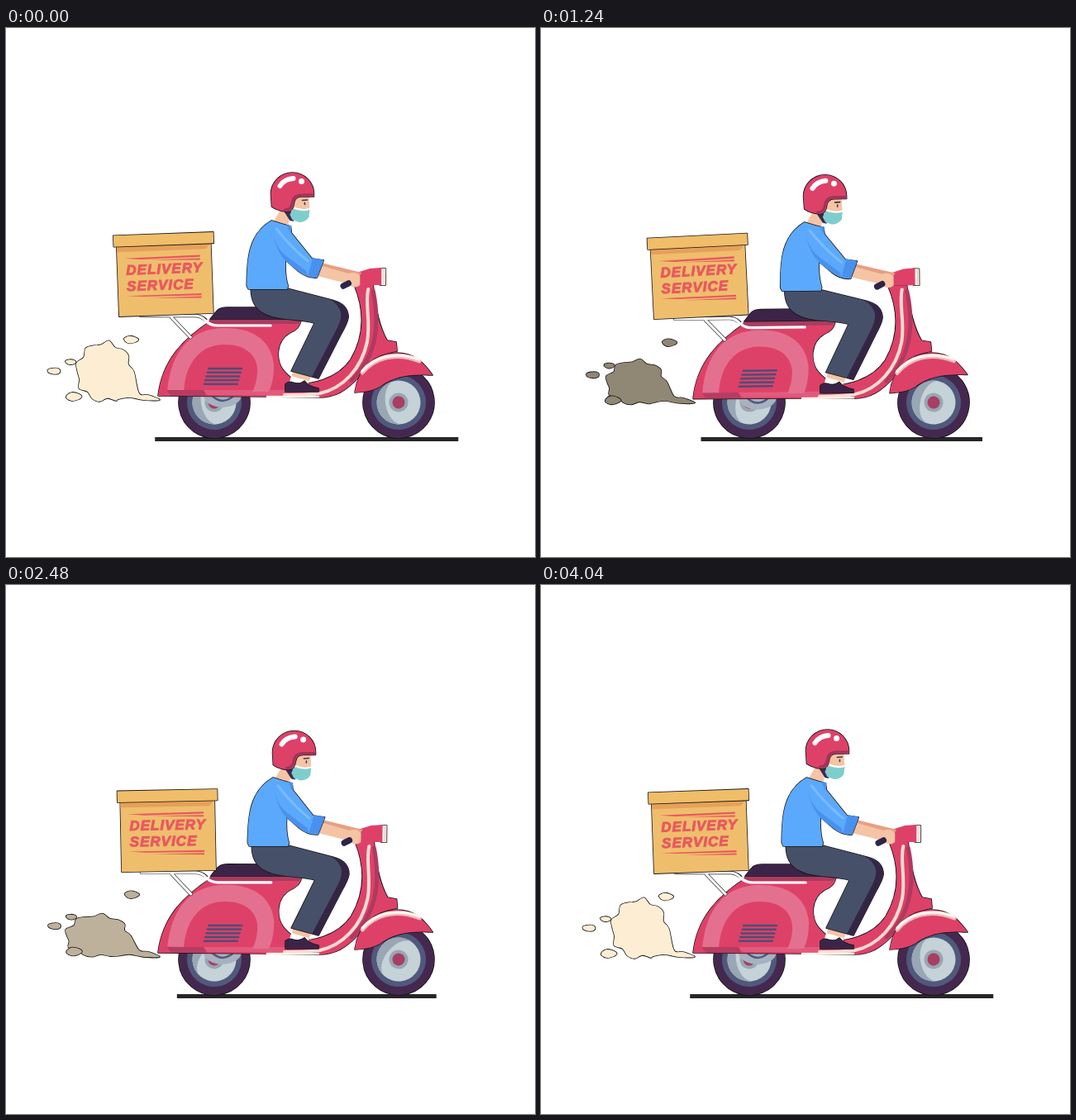
These frames come from a looping animation (640x640 px, 4.08 s). An HTML page:

```html
<!DOCTYPE html>
<html lang="en">
<head>
<meta charset="utf-8">
<title>Delivery scooter</title>
<style>
  html, body { margin: 0; width: 100%; height: 100%; overflow: hidden; background: #fff; }
  svg { display: block; width: 100vw; height: 100vh; }
  .edge { stroke: #151317; stroke-width: 1.6; paint-order: stroke; stroke-linejoin: round; }
  .line { fill: none; stroke-linecap: round; stroke-linejoin: round; }
  text { font: italic bold 17px "Liberation Sans", Arial, sans-serif; letter-spacing: 1px; fill: #e8585f; stroke: #e8585f; stroke-width: .9; }
</style>
</head>
<body>
<svg viewBox="0 0 640 640">
  <defs>
    <g id="wheel">
      <circle r="43" fill="#45284f" class="edge"/>
      <circle r="33" fill="#50597c"/>
      <circle r="26.5" fill="#c5d2d7"/>
      <path d="M0-26.5A26.5 26.5 0 0 0 0 26.5A16 26.5 0 0 1 0-26.5Z" fill="#99a6b4"/>
      <circle r="11.5" fill="#99a6b4"/>
      <circle r="7.5" fill="#a73f62"/>
    </g>
  </defs>

  <rect id="ground" y="495" height="5" fill="#262626"/>
  <path id="speed" stroke="#0d3a6b" stroke-width="1.8" d="M250 276H296M250 284H296M250 293H273"/>

  <g class="chassis">
    <g id="smoke" class="edge"></g>
  </g>

  <g transform="translate(252 453)"><use href="#wheel" class="spin"/></g>

  <g class="chassis">
    <!-- engine -->
    <path d="M239 444A23 15 0 0 0 285 444Z" fill="#a6b2c0"/>
    <path class="line" d="M245 440Q262 462 280 440M255 444H270" stroke="#50597c" stroke-width="2.5"/>
    <!-- rear body and floor -->
    <path class="edge" fill="#de4168" d="M184 445C189 402 214 376 250 353L357 352C356 362 350 366 343 369C326 379 327 401 334 412Q338 418 346 424L344 430C368 433 401 425 417 401C435 370 433 340 421 311L444 311C447 343 452 362 461 378L472 380L473 391C448 395 438 405 429 420C411 440 398 447 378 447L315 446Z"/>
    <path fill="#e4708f" d="M195 440C199 390 224 364 262 363C302 362 322 381 324 409Q324 427 318 440Z"/>
    <path fill="#de4168" d="M215 440C217 404 236 383 264 383C291 383 305 397 304 417Q303 431 298 440Z"/>
    <path fill="#b63c62" d="M194 438H239L242 445H200Z"/>
    <path fill="#e4708f" d="M239 438H338L342 444H244Z" opacity=".55"/>
    <path id="vents" class="line" stroke="#4d4d76" stroke-width="2.5"/>
    <!-- leg shield -->
    <path class="line" stroke="#b0395f" stroke-width="5" d="M444 318C452 357 449 397 418 426"/>
    <path class="line" stroke="#fbdcd2" stroke-width="4" d="M438 316C434 334 441 353 437 379C430 413 407 436 380 442Q363 444 337 444"/>
    <path class="line" stroke="#fff3e9" stroke-width="2.5" d="M316 446H378"/>
    <!-- seat -->
    <path fill="#a93c60" d="M246 352H357L354 358H244Z"/>
    <path class="edge" fill="#3c2448" d="M247 352C254 344 255 338 267 338H330L357 352Z"/>
    <!-- rack -->
    <g class="line">
      <path stroke="#29272d" stroke-width="4.5" d="M163 348H228Q235 348 241 353M200 350L223 374"/>
      <path stroke="#fff" stroke-width="3.2" d="M163 348H228Q236 348 241 354Q247 360 256 360H320M200 350L223 374"/>
    </g>
    <!-- headlamp -->
    <path class="edge" fill="#fff1e8" d="M452 291H459V311H452Z"/>
    <path fill="#de4168" d="M421 311L424 296L440 291L454 290V311Z"/>
    <path stroke="#d9c6c6" d="M457 292V310"/>
  </g>

  <g id="box">
    <path class="edge" fill="#efbe6d" d="M136.5 262H250.5V348H136.5Z"/>
    <path fill="#e5a159" d="M136.5 263H250.5L244 270H136.5Z"/>
    <path class="edge" fill="#f0bd69" d="M133 250H254V263.5H133Z"/>
    <path fill="#e8585f" d="M145 278L237 277V279.3L165 280ZM174 281H237V283ZM146 323.5H237V325.7L165 325ZM174 327H237V329Z"/>
    <text x="147" y="298">DELIVERY</text>
    <text x="147" y="317.5">SERVICE</text>
  </g>

  <g transform="translate(475 453)"><use href="#wheel" class="spin"/></g>

  <g class="chassis">
    <!-- front fender -->
    <path class="edge" fill="#de4168" d="M422 441C426 411 446 394 472 393C495 393 506 406 516 420C488 418 470 422 455 432Q445 440 422 441Z"/>
    <path class="line" stroke="#efb9bd" stroke-width="5" d="M431 417C445 400 470 391 500 403"/>
    <path class="line" stroke="#fff6ee" stroke-width="3.5" d="M431 415C445 398 470 390 500 401"/>

    <!-- foot -->
    <path fill="#f4c4a5" d="M347 414L369 420L366 430L345 427Z"/>
    <path fill="#fff" d="M345 421L366 427L365 432L343 428Z"/>
    <path class="edge" fill="#3c2448" d="M338 431Q342 427 347 429Q355 432 361 427Q366 434 378 436V440H338Z"/>
    <!-- trousers -->
    <path class="edge" fill="#475069" d="M296 315H340L394 329Q414 334 414 350Q413 357 406 369L378 424L345 415L373 357C350 351 328 354 312 345Q296 337 296 315Z"/>
    <path fill="#352544" d="M390 328Q415 334 414 350Q413 357 406 369L378 424L370 422L400 364Q409 347 402 338Q398 331 390 328Z"/>

    <!-- arms and grip -->
    <path fill="#e79f82" d="M377 283L430 296L426 302L378 291Z"/>
    <path fill="#f4c4a5" d="M379 287L414 297Q423 294 428 300V311Q421 317 412 309L376 300Z"/>
    <path class="line" stroke="#2e2447" stroke-width="7.5" d="M408 312L414 309"/>
    <!-- shirt -->
    <path fill="#f4c4a5" d="M332 219H344L341 240L323 235Z"/>
    <path class="edge" fill="#5ba9fc" d="M321 233Q333 237 344 240L345 248L370 279L384 281L376 302Q364 303 353 294L338 281Q337 300 341 312L340 316H293L291 312C291 279 293 249 321 233Z"/>
    <path fill="#4991ee" d="M322 245Q325 266 339 276L363 294L365 300Q354 296 338 282Q325 268 322 245Z"/>
    <path class="line" stroke="#79bbff" stroke-width="3" d="M327 243Q345 266 365 282"/>
    <path fill="#4991ee" d="M371 278L384 281L376 302L365 300ZM339 238L345 239L344 249Z"/>

    <g id="head">
      <path fill="#f4c4a5" d="M346 203H366L367 222L345 226Z"/>
      <path class="line" stroke="#463047" stroke-width="1.6" d="M358 208.5L364 208M361 211.5V213.5"/>
      <path fill="#3b2b50" d="M334 219L344 220L348 234L343 233Z"/>
      <path fill="#7ecdcd" d="M346 219Q357 222 367 219L366 229Q362 235 354 235L346 232L343 226Z"/>
      <path class="line" stroke="#fff" stroke-width="2" d="M347 217Q357 222 367 219"/>
      <path class="edge" fill="#de4168" d="M320 201A26 26 0 0 1 372 201V204H357Q349 204 348 212Q347 222 339 222Q328 221 321 216Z"/>
      <path class="line" stroke="#9c3459" stroke-width="3" d="M371 202H357Q347 202 346 211Q345 220 337 220"/>
      <path class="line" stroke="#fff" stroke-width="6" d="M331 191Q336 183 347 182"/>
      <circle cx="357" cy="185.5" r="3.5" fill="#fff"/>
    </g>
  </g>
</svg>
<script>
  const $ = s => document.querySelector(s);
  const all = s => [...document.querySelectorAll(s)];
  const { sin, cos, PI } = Math;
  const LOOP = 4080, CYCLE = 4040, BEAT = CYCLE / 4;
  const mix = (a, b, k) => a + (b - a) * k;

  const ground = $('#ground'), speed = $('#speed'), smoke = $('#smoke');
  const box = $('#box'), head = $('#head');
  const chassis = all('.chassis'), wheels = all('.spin');

  $('#vents').setAttribute('d', Array.from({ length: 5 },
    (_, i) => `M${245 - i * 1.3} ${412 + i * 4.7}H${285 - i * 1.3}`).join(''));

  // Closed Catmull-Rom curve through [x, y] points
  function curve(points) {
    const at = i => points.at(i % points.length);
    return `M${at(0)}` + points.map((b, i) => {
      const a = at(i - 1), c = at(i + 1), e = at(i + 2);
      return `C${b.map((v, k) => v + (c[k] - a[k]) / 6)} ${c.map((v, k) => v - (e[k] - b[k]) / 6)} ${c}`;
    }).join('') + 'Z';
  }

  // Uneven arc of an ellipse, counter-clockwise from its right side
  const lumps = (cx, cy, rx, ry, count, sweep, seed) => Array.from({ length: count }, (_, i) => {
    const angle = -sweep * i / count;
    const r = 1 + .09 * sin(i * 2.4 + seed);
    return [cx + rx * r * cos(angle), cy + ry * r * sin(angle)];
  });

  const puffs = {
    tall: { x: 119, y: 416, rx: 33, ry: 35, dx: 0, dy: 0, red: 253, green: 238, blue: 211 },
    small: { x: 118, y: 424, rx: 33, ry: 27, dx: 8, dy: 1, red: 112, green: 105, blue: 88 },
    wide: { x: 104, y: 425, rx: 41, ry: 23, dx: -6, dy: -5, red: 253, green: 238, blue: 211 }
  };
  const drops = [
    { x: 58, y: 415, r: 7.5 }, { x: 78, y: 404, r: 6 }, { x: 151, y: 377, r: 8.5 }, { x: 82, y: 446, r: 9.5 }
  ];
  const puffParts = [0, ...drops].map(() =>
    smoke.appendChild(document.createElementNS('http://www.w3.org/2000/svg', 'path')));

  function drawSmoke(t) {
    const u = t <= CYCLE / 2 ? t / BEAT : 4 - t / BEAT;
    const [from, to] = u < 1 ? [puffs.tall, puffs.small] : [puffs.small, puffs.wide];
    const p = {};
    for (const key in from) p[key] = mix(from[key], to[key], u < 1 ? u : u - 1);

    const body = lumps(p.x, p.y, p.rx, p.ry, 19, 1.72 * PI, 2);
    const outline = [[186, 450], [172, 444], [161, 442], ...body, [136, 449], [150, 447], [166, 450]];
    puffParts[0].setAttribute('d', curve(outline));
    drops.forEach(({ x, y, r }, i) =>
      puffParts[i + 1].setAttribute('d', curve(lumps(x + p.dx, y + p.dy, r, r * .5, 7, 2 * PI, i))));
    smoke.setAttribute('fill', `rgb(${[p.red, p.green, p.blue].map(Math.round)})`);
  }

  function drawGround(t) {
    const p = t / BEAT % 1, turn = .48;
    const half = 183.5 - 28 * (p < turn ? p / turn : (1 - p) / (1 - turn));
    ground.setAttribute('x', 363.75 - half);
    ground.setAttribute('width', 2 * half);
  }

  function drawScooter(t) {
    const a = 2 * PI * t / CYCLE, s = sin(a), c = cos(a);
    const lean = .002 - .013 * s;
    const pitch = .003 + .0088 * s - .003 * c;
    chassis.forEach(el =>
      el.setAttribute('transform', `matrix(1 ${-pitch} ${-lean} 1 ${440 * lean} ${475 * pitch})`));
    head.setAttribute('transform', `translate(0 ${.9 * (1 - c)})`);

    const x = -2 - 2.6 * s - 1.2 * c + .9 * sin(2 * a);
    const y = -.6 + 2.2 * s - .3 * c;
    const tilt = -1.3 - .9 * s - .8 * cos(3 * a);
    box.setAttribute('transform', `translate(${x} ${y}) rotate(${tilt} 193.5 250)`);
    wheels.forEach(el => el.setAttribute('transform', `rotate(${t / CYCLE * 3600 - 10})`));
  }

  function draw(time) {
    const t = Math.min(Math.floor(time % LOOP / 40) * 40, CYCLE);
    drawGround(t);
    drawSmoke(t);
    drawScooter(t);
    speed.setAttribute('visibility', t >= 1900 && t < 1960 ? 'visible' : 'hidden');
  }

  const start = performance.now();
  function tick(now) {
    draw(Math.max(0, now - start));
    requestAnimationFrame(tick);
  }
  draw(0);
  requestAnimationFrame(tick);
</script>
</body>
</html>
```
